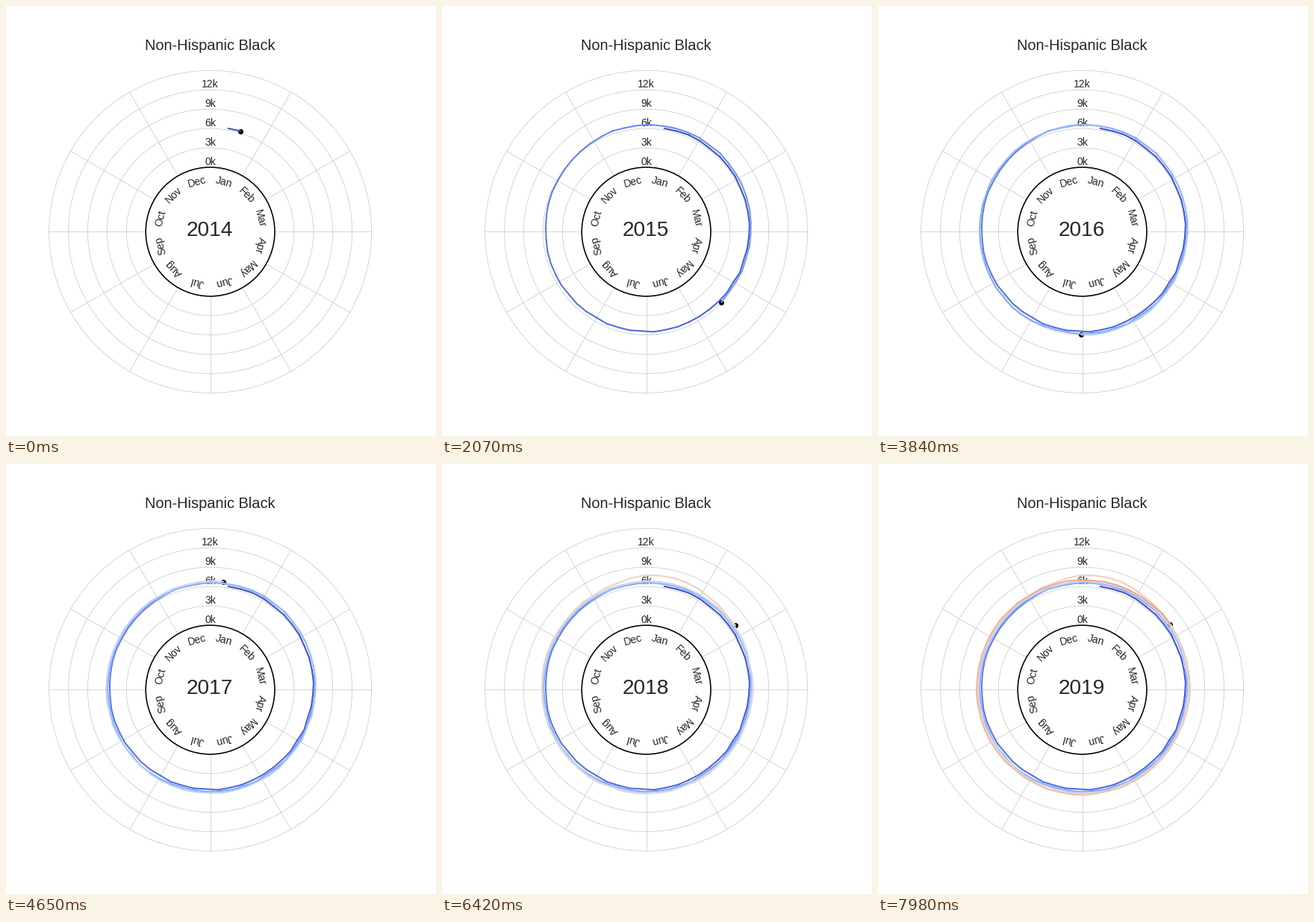
Write a matplotlib script that moves like this. It is 576 px wide and 576 px high and loops after 8000 ms.

```python
import numpy as np
import matplotlib.pyplot as plt
from matplotlib.animation import FuncAnimation
from matplotlib.collections import LineCollection
from matplotlib.patches import Circle

plt.rcParams["font.family"] = "Liberation Sans"

SIZE = 576
CX, CY = 273.6, 302.4
R_ZERO, R_STEP = 86.4, 25.92   # zero ring and 3k spacing in pixels
STEPS = 267
TOTAL_WEEKS = 360              # span of the colour scale
FIRST_DAY = 10                 # 11 January
INK = "#262626"
GRID = dict(color="0.8", lw=0.8, zorder=1)
MONTHS = "Jan Feb Mar Apr May Jun Jul Aug Sep Oct Nov Dec".split()

# Radius in pixels at each winter peak and each summer low
PEAKS = [141, 144.3, 143.6, 146.3, 147, 147.6]
LOWS = [133.8, 137, 138.2, 139.4, 140.8]
PEAK_AT, LOW_AT = 0.07, 0.6    # as parts of a year


def polar(theta, r):
    """Clockwise angle from the top to stage pixels."""
    return CX + r * np.sin(theta), CY - r * np.cos(theta)


def season(t):
    """Radius after t years: a yearly swell plus one sharp winter wave."""
    peak = np.interp(t, np.arange(len(PEAKS)) + PEAK_AT, PEAKS)
    low = np.interp(t, np.arange(len(LOWS)) + LOW_AT, LOWS)
    swell = (0.5 + 0.5 * np.cos(2 * np.pi * (t - PEAK_AT))) ** 2
    wave = 8 * np.exp(-((t - 4.025) / 0.07) ** 2)
    return low + (peak - low) * swell + wave


days = FIRST_DAY + 7 * np.arange(STEPS + 1)
years = days / 365
jitter = np.random.default_rng(4).normal(0, 0.4, STEPS + 1)
points = np.column_stack(polar(2 * np.pi * years, season(years) + jitter))
segments = np.stack([points[:-1], points[1:]], axis=1)
colors = plt.get_cmap("coolwarm")(np.arange(STEPS) / TOTAL_WEEKS)

fig = plt.figure(figsize=(8, 8), dpi=72, facecolor="white")
ax = fig.add_axes([0, 0, 1, 1])
ax.set_xlim(0, SIZE)
ax.set_ylim(SIZE, 0)
ax.axis("off")


def label(x, y, text, size, **kw):
    return ax.text(x, y, text, size=size, color=INK, ha="center", zorder=1.5, **kw)


def ring(r, **kw):
    ax.add_patch(Circle((CX, CY), r, fill=False, **kw))


for k in range(1, 6):
    ring(R_ZERO + k * R_STEP, **GRID)
for k in range(5):
    label(CX, CY - R_ZERO - k * R_STEP, f"{3 * k}k", 14, va="bottom")
for m, name in enumerate(MONTHS):
    if m:  # the labelled axis at the top has no spoke
        spoke = polar(np.radians(30 * m), np.array([R_ZERO, R_ZERO + 5 * R_STEP]))
        ax.plot(*spoke, **GRID)
    mid = 30 * m + 15
    label(*polar(np.radians(mid), 69.1), name, 14, va="center", rotation=-mid)
ring(R_ZERO, color="black", lw=1.6, zorder=1.6)

label(CX, 59, "Non-Hispanic Black", 20, va="baseline")
year = label(CX - 0.6, CY - 1, "2014", 28, va="center")
dot, = ax.plot([], [], "o", color="black", ms=7, mew=0, zorder=1.8)
trail = LineCollection([], linewidths=2, capstyle="round", zorder=2)
ax.add_collection(trail, autolim=False)


def update(step):
    trail.set_segments(segments[:step + 1])
    trail.set_color(colors[:step + 1])
    dot.set_data(*points[step + 1][:, None])
    year.set_text(str(2014 + int(days[step + 1] / 365.25)))
    return trail, dot, year


anim = FuncAnimation(fig, update, frames=STEPS, interval=30, repeat=True,
                     repeat_delay=0)
plt.show()
```
